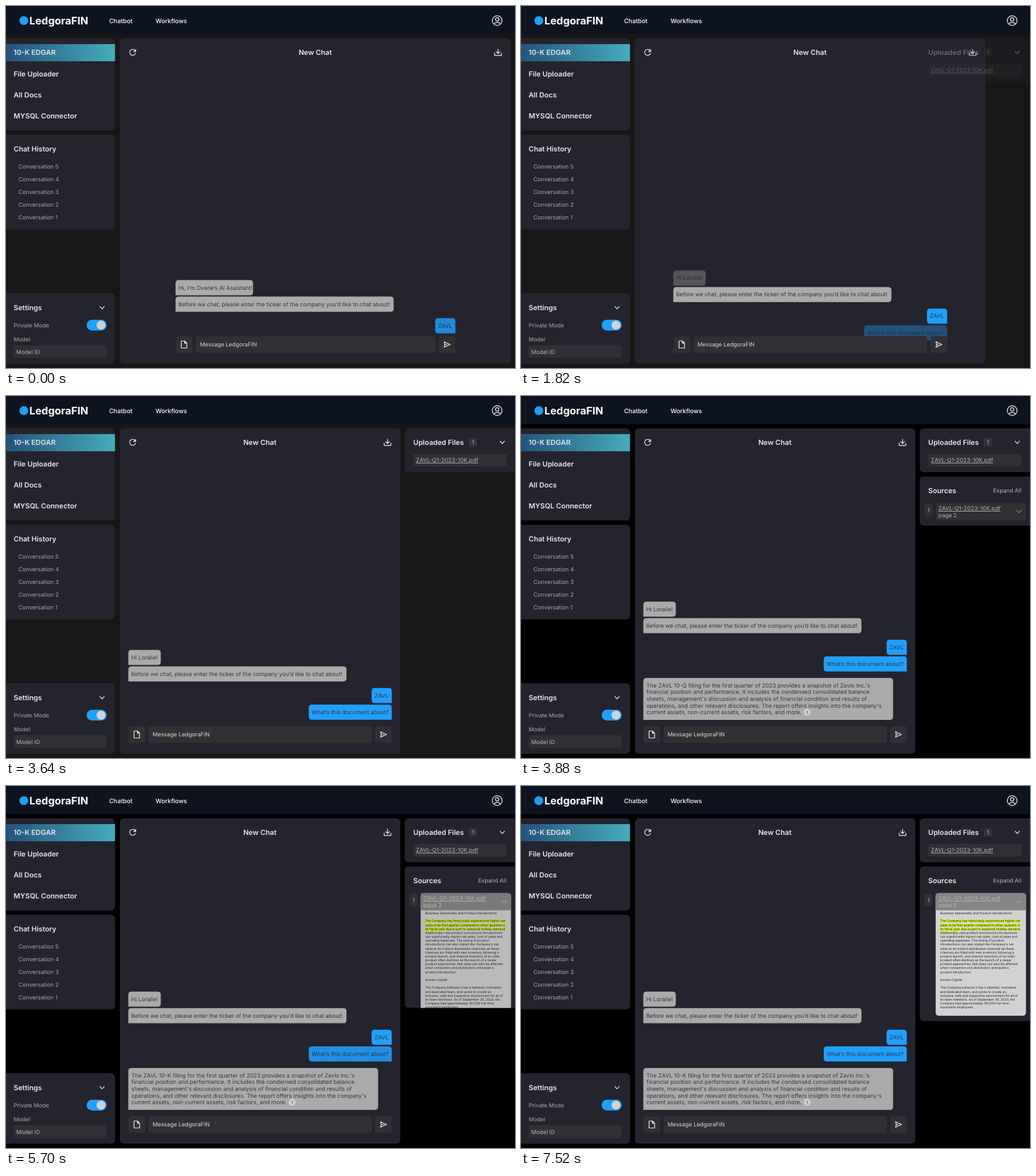
Animation of 800 by 570 pixels, one loop 7550 ms. Source, as an HTML page:

```html
<!DOCTYPE html>
<html lang="en">
<head>
<meta charset="utf-8">
<title>Chat workspace</title>
<style>
  html, body { margin: 0; width: 100%; height: 100%; overflow: hidden; background: #000; }
  svg { display: block; }
  text { font-family: Inter, sans-serif; white-space: pre; text-rendering: geometricPrecision; }
  .icon { fill: none; stroke: #eee; stroke-width: 1.2; stroke-linecap: round; stroke-linejoin: round; }
</style>
</head>
<body>
<script>
const LOOP = 7550;
const PANEL = '#24242e', FIELD = '#303035', GRAY = '#aaaaaa', BLUE = '#209fff', INK = '#35353d';

// Markup helpers; y of a label is its vertical centre
const label = (x, y, s, { size = 8.89, weight = 400, fill = '#dcdcde', extra = '' } = {}) =>
  `<text x="${x}" y="${y + size * 0.36}" font-size="${size}" font-weight="${weight}" fill="${fill}" ${extra}>${s}</text>`;
const title = (x, y, s, extra = '') => label(x, y, s, { size: 11.11, weight: 600, fill: '#e8e8ea', extra });
const box = (x, y, w, h, r, fill, extra = '') =>
  `<rect x="${x}" y="${y}" width="${w}" height="${h}" rx="${r}" fill="${fill}" ${extra}/>`;
const icon = (x, y, d, extra = '') => `<path class="icon" transform="translate(${x} ${y})" d="${d}" ${extra}/>`;
const group = (id, content) => `<g id="${id}">${content}</g>`;
const DOWN = 'M-3.5-1.8L0 1.8L3.5-1.8', UP = 'M-3.5 1.8L0-1.8L3.5 1.8';

// Rounded bubble with one square bottom corner
function bubble(x, y, w, h, mine) {
  const r = 5, a = mine ? 0 : r, b = mine ? r : 0;
  return `<path fill="${mine ? BLUE : GRAY}" d="M${x + r} ${y}h${w - 2 * r}q${r} 0 ${r} ${r}v${h - r - a}q0 ${a} ${-a} ${a}
    h${-(w - a - b)}q${-b} 0 ${-b} ${-b}v${-(h - r - b)}q0 ${-r} ${r} ${-r}z"/>`;
}
const message = (x, y, w, s, mine) =>
  bubble(x, y, w, 23.8, mine) + label(x + 4.4, y + 11.8, s, { fill: INK });

const menu = ['10-K EDGAR', 'File Uploader', 'All Docs', 'MYSQL Connector'];
const answer = [
  'The ZAVL <tspan id="form">10-Q</tspan> filing for the first quarter of 2023 provides a snapshot of Zavlo Inc.\'s',
  'financial position and performance. It includes the condensed consolidated balance',
  'sheets, management\'s discussion and analysis of financial condition and results of',
  'operations, and other relevant disclosures. The report offers insights into the company\'s',
  'current assets, non-current assets, risk factors, and more.'
];
const excerpt = `Business Seasonality and Product Introductions

The Company has historically experienced higher net
sales in its first quarter compared to other quarters in
its fiscal year due in part to seasonal holiday demand.
Additionally, new product and service introductions
can significantly impact net sales, cost of sales and
operating expenses. The timing of product
introductions can also impact the Company's net
sales to its indirect distribution channels as these
channels are filled with new inventory following a
product launch, and channel inventory of an older
product often declines as the launch of a newer
product approaches. Net sales can also be affected
when consumers and distributors anticipate a
product introduction.

Human Capital

The Company believes it has a talented, motivated
and dedicated team, and works to create an
inclusive, safe and supportive environment for all of
its team members. As of September 30, 2023, the
Company had approximately 161,000 full-time
equivalent employees.`.split('\n');
const file = 'ZAVL-Q1-2023-10K.pdf';
const fileLabel = (x, y, fill) => label(x, y, file, { fill, extra: 'text-decoration="underline"' });

const header =
  box(0, 0, 800, 44.5, 0, '#0d1420') +
  '<circle cx="28" cy="23" r="7" fill="#249df0"/>' +
  label(36.8, 23.5, 'LedgoraFIN', { size: 16.4, weight: 700, fill: '#fff' }) +
  label(162, 23.5, 'Chatbot', { size: 9.7, weight: 500, fill: '#fff' }) +
  label(235, 23.5, 'Workflows', { size: 9.7, weight: 500, fill: '#fff' }) +
  icon(772, 23, 'M-7.7 0a7.7 7.7 0 1 0 15.4 0a7.7 7.7 0 1 0-15.4 0M-2.7-2a2.7 2.7 0 1 0 5.4 0a2.7 2.7 0 1 0-5.4 0M-4.8 5.8q.5-3 4.8-3t4.8 3');

const sidebar =
  box(-8, 51, 179.3, 145, 6, PANEL) +
  box(0, 60, 171.3, 27, 0, 'url(#active)') +
  menu.map((s, i) => title(12, 73.3 + i * 33.4, s)).join('') +
  box(-8, 202.7, 179.3, 149, 6, PANEL) +
  title(12, 224.8, 'Chat History') +
  [5, 4, 3, 2, 1].map((n, i) => label(19.5, 252.8 + i * 20, 'Conversation ' + n, { fill: '#a9a9ae' })).join('') +
  box(-8, 452.3, 179.3, 111, 6, PANEL) +
  title(12, 475, 'Settings') + icon(151, 475, DOWN) +
  label(12, 503, 'Private Mode', { fill: '#a9a9ae' }) +
  box(126.7, 494, 31.5, 17, 8.5, BLUE) + '<circle cx="149.3" cy="502.5" r="7" fill="#d2d2d4"/>' +
  label(12, 524.5, 'Model', { fill: '#a9a9ae' }) +
  box(12, 534, 146, 20, 4, FIELD) + label(16, 544.5, 'Model ID', { fill: '#b4b4b8' });

const chat =
  box(179, 51, 614.5, 512, 6, PANEL, 'id="panel"') +
  icon(199, 73, 'M4.6-1.3A4.7 4.7 0 1 0 4.5 1.6M4.8-4.6V-1.3H1.6') +
  title(486, 73.3, 'New Chat', 'id="heading" text-anchor="middle"') +
  group('download', icon(0, 73, 'M-5.3 1.2V4.8H5.3V1.2M0-5V1.6M-2.8-1L0 1.8L2.8-1')) +
  group('theirs',
    group('hello', message(266.5, 426, 121.8, 'Hi, I’m Ovane’s AI Assistant!')) +
    group('helloName', message(266.5, 426, 51, 'Hi Loralie!')) +
    message(266.5, 452, 342.8, 'Before we chat, please enter the ticker of the company you’d like to chat about!') +
    group('answer', bubble(266.5, 546.2, 392.5, 66) +
      answer.map((s, i) => label(271.2, 558 + i * 10.6, s, { fill: INK })).join('') +
      '<circle cx="524" cy="600.4" r="5.5" fill="#d0d0d2"/>' +
      label(524, 600.4, '1', { size: 7, fill: INK, extra: 'text-anchor="middle"' }))) +
  group('mine',
    group('ticker', message(674.6, 486, 31.7, 'ZAVL', true)) +
    group('question', message(575.8, 512.2, 130.5, 'What’s this document about?', true))) +
  group('composer',
    box(266.7, 520, 26.3, 26.3, 4, FIELD) +
    icon(279.8, 533, 'M-4.3-5.5H1L4.3-2.2V5.5H-4.3zM1-5.5V-2.2H4.3') +
    box(298, 520, 377, 26.3, 4, FIELD, 'id="input"') +
    label(304.7, 533, 'Message LedgoraFIN')) +
  group('send',
    box(680, 520, 26.3, 26.3, 4, FIELD) + icon(693, 533, 'M-4.3-4.3L5 0L-4.3 4.3L-3.2 0zM-3.2 0H0'));

const row = (fill, ink, chevron) =>
  box(651.7, 168.8, 142, 26.7, 4, fill) + fileLabel(656, 176.9, ink) +
  label(656, 187.5, 'page 2', { fill: ink }) + icon(782.5, 182, chevron, `style="stroke:${ink};stroke-width:1"`);

const files = group('files',
  box(626.7, 51, 185, 69, 6, PANEL) + title(640, 73.3, 'Uploaded Files') +
  box(727.5, 66.5, 13, 13, 3, '#35353b') + label(734, 73.2, '1', { fill: '#b4b4b8', extra: 'text-anchor="middle"' }) +
  icon(780, 73, DOWN) + box(640, 91, 147, 20, 4, FIELD) + fileLabel(644.3, 101, '#b4b4b8'));

const marker = (y, w, h) => box(658.3, y, w, h, 0, '#d9f22c');
const sources = `<svg id="sources" x="0" y="126.5" width="800" height="77.5"><g transform="translate(0 -126.5)">` +
  box(626.7, 126.5, 185, 77.5, 6, PANEL, 'id="sourcePanel"') +
  title(640, 148.8, 'Sources') + label(742, 148.8, 'Expand All', { fill: '#b8b8bc' }) +
  box(634, 169.5, 13, 20, 4, FIELD) + label(640.5, 179.5, '1', { fill: '#b4b4b8', extra: 'text-anchor="middle"' }) +
  row(FIELD, '#b4b4b8', DOWN) +
  group('doc',
    box(651.7, 168.8, 142, 193, 5, '#d2d2d2') + row('#858585', '#b5b5b5', UP) +
    box(651.7, 191, 142, 4.5, 0, '#858585') +
    [0, 1, 2].map(i => marker(210.4 + i * 6.17, 127, 4.2)).join('') + marker(227.6, 31.5, 2) +
    excerpt.map((s, i) => label(658.8, 200.3 + i * 6.17, s, { size: 5, fill: '#1c1c1c' })).join('')) +
  '</g></svg>';

document.body.innerHTML = `<svg width="800" height="570" viewBox="0 0 800 570">
  <defs><linearGradient id="active"><stop stop-color="#25527c"/><stop offset="1" stop-color="#45adba"/></linearGradient></defs>
  ${box(0, 0, 800, 570, 0, '#171717', 'id="page"')}${header}${sidebar}${chat}${files}${sources}</svg>`;

const set = (id, attrs) => {
  const el = document.getElementById(id);
  for (const name in attrs) el.setAttribute(name, attrs[name]);
};
const fade = (id, opacity) => set(id, { opacity });
const easeOut = (t, start, duration) => {
  const x = Math.min(1, Math.max(0, (t - start) / duration));
  return 1 - (1 - x) ** 2;
};

function draw(t) {
  const asked = easeOut(t, -177, 300);
  const loaded = easeOut(t, 1760, 300);
  const replied = easeOut(t, 3645, 215);
  const opened = easeOut(t, 5507, 300);

  // Main column narrows when the files appear
  const left = -74.2 * loaded, right = -100 * loaded;
  set('panel', { width: 614.5 - 173.7 * loaded });
  set('heading', { x: 486 - 87 * loaded });
  set('download', { transform: `translate(${773.3 - 173.7 * loaded} 0)` });
  set('composer', { transform: `translate(${left} 0)` });
  set('input', { width: 377 + right - left });
  set('send', { transform: `translate(${right} 0)` });

  // Every new message pushes the stack upwards
  const rise = 34 * (1 - asked) - 26.2 * loaded - 76.1 * replied;
  set('theirs', { transform: `translate(${left} ${rise})` });
  set('mine', { transform: `translate(${right} ${rise})` });
  fade('ticker', asked);
  fade('hello', loaded > 0 ? 0 : 1);
  fade('helloName', loaded);
  fade('question', opened > 0 ? opened : loaded);
  fade('answer', replied);
  document.getElementById('form').textContent = opened > 0 ? '10-K' : '10-Q';

  const shade = 23 * (1 - replied);
  set('page', { fill: `rgb(${shade},${shade},${shade})` });
  fade('files', loaded);
  const height = 77.5 + 166.3 * opened;
  set('sources', { height, opacity: replied });
  set('sourcePanel', { height });
  fade('doc', opened);
}

function tick() {
  draw(performance.now() % LOOP);
  requestAnimationFrame(tick);
}
tick();
</script>
</body>
</html>
```
